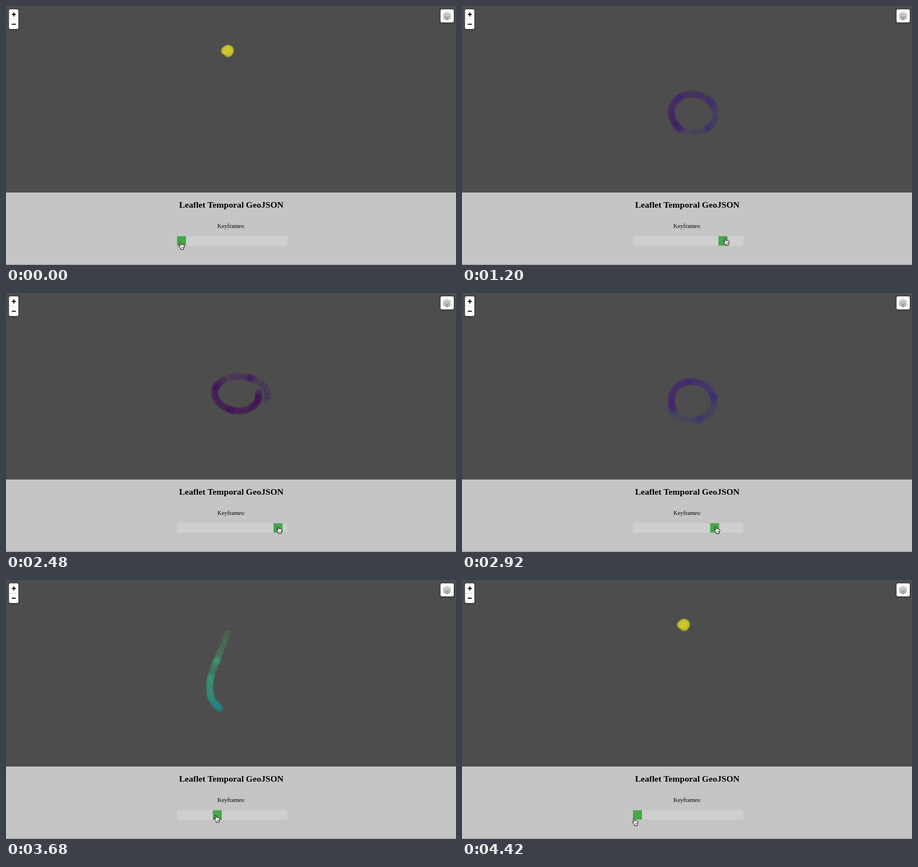
Write an HTML page with a canvas that moves like this. It is 800 px wide and 461 px high and loops after 4460 ms.

```html
<!DOCTYPE html>
<html lang="en">
<head>
<meta charset="utf-8">
<title>Leaflet Temporal GeoJSON</title>
<style>
html, body { margin: 0; width: 100%; height: 100%; overflow: hidden; background: #4d4d4d; }
canvas { display: block; }
</style>
</head>
<body>
<canvas id="stage" width="800" height="461"></canvas>
<script>
const ctx = document.getElementById('stage').getContext('2d');
const LOOP = 4460, LAG = 60, LAST = 36.7, STEP = 4.9;
const RAMP = [[208, 198, 46], [155, 214, 44], [65, 180, 105], [30, 122, 146], [40, 82, 142], [64, 34, 122], [64, 6, 88]];
const RAMP_STEP = 6;

const clamp = (v, lo = 0, hi = 1) => Math.min(hi, Math.max(lo, v));
const mix = (a, b, f) => a + (b - a) * f;
const easeOut = (v, power) => 1 - (1 - clamp(v)) ** power;

let seed = 7;
function random() {
  seed = (seed * 16807) % 2147483647;
  return seed / 2147483647;
}

// Place in the swarm (0 tail, 1 head): bunched towards the tail, denser towards the head
const dots = Array.from({ length: 64 }, (_, i) => {
  const q = ((i + random()) / 64) ** 0.75;
  return {
    q: q - 0.034 * (1 - q) * Math.sin(2 * Math.PI * q / 0.23),
    dx: 6 * (2 * random() - 1) ** 3,
    dy: 5 * (2 * random() - 1) ** 3,
    alpha: 0.16 + 0.12 * random()
  };
});

// The slider is dragged to the end, rests, and is dragged back
function progress(t) {
  return t < 2200 ? easeOut(t / 1800, 1.75) : easeOut((4220 - t) / 2000, 1.4);
}

// The swarm sinks from the top and winds into a drifting, flattening eddy
function position({ q, dx, dy }, s) {
  const age = s / 36;
  const tail = 270 * age ** 4;
  const head = 3.04 * s ** 1.5 * (1 - Math.exp(-((s / 9) ** 2)));
  const angle = mix(tail, head, q) * Math.PI / 180;
  const rx = 35 + 18 * age ** 3 * (1 - q);
  const ry = 38 - 8 * age ** 4;
  const rise = 78 * Math.exp(-angle / 0.57);
  const loose = Math.exp(-s / 10);
  return [
    394 + 21 * age ** 2 - rx * Math.sin(angle) + dx * loose,
    196 - 20 * age ** 8 - ry * Math.cos(angle) - rise + dy * loose
  ];
}

function rampColor(s) {
  const u = clamp(s / RAMP_STEP, 0, RAMP.length - 1.001), i = Math.floor(u);
  return RAMP[i].map((v, c) => Math.round(mix(v, RAMP[i + 1][c], u - i)));
}

function drawSwarm(s) {
  for (const dot of dots) {
    const [x, y] = position(dot, s);
    const shade = s + 5 * (dot.q - 0.5) * clamp(s / 6);
    ctx.fillStyle = `rgba(${rampColor(shade)},${dot.alpha})`;
    ctx.beginPath();
    ctx.arc(x, y, 6.7, 0, 7);
    ctx.fill();
  }
}

function rect(color, x, y, w, h) {
  ctx.fillStyle = color;
  ctx.fillRect(x, y, w, h);
}

function button(x, y, w, h) {
  ctx.save();
  ctx.shadowColor = 'rgba(0,0,0,.65)';
  ctx.shadowBlur = 3.3;
  ctx.shadowOffsetY = 0.7;
  ctx.fillStyle = '#fff';
  ctx.beginPath();
  ctx.roundRect(x, y, w, h, 2.7);
  ctx.fill();
  ctx.restore();
}

function drawControls() {
  button(5.3, 6, 16.7, 35);
  rect('#ccc', 5.3, 23, 16.7, 0.7);
  for (const y of [15, 32.5]) rect('#000', 10.3, y - 0.9, 7.2, 1.8);
  rect('#000', 13, 11.4, 1.8, 7.2);
  button(772.5, 6, 23.5, 23.3);
  for (let i = 0; i < 3; i++) {
    const y = 21 - i * 3.4;
    ctx.beginPath();
    ctx.moveTo(784, y - 4.8);
    ctx.lineTo(792.5, y);
    ctx.lineTo(784, y + 4.8);
    ctx.lineTo(775.5, y);
    ctx.closePath();
    const shade = ctx.createLinearGradient(0, y - 4.8, 0, y + 4.8);
    shade.addColorStop(0, '#e2e2e2');
    shade.addColorStop(1, i < 2 ? '#777' : '#b0b0b0');
    ctx.fillStyle = shade;
    ctx.fill();
    ctx.strokeStyle = '#f4f4f4';
    ctx.lineWidth = 0.7;
    ctx.stroke();
  }
}

function label(text, y, font) {
  ctx.font = font + ' "Liberation Serif", serif';
  ctx.textAlign = 'center';
  ctx.fillStyle = '#000';
  ctx.fillText(text, 400.5, y);
}

const hand = new Path2D(`M-3.6-5.2 C-3.6-6.8-1.6-6.8-1.4-5.2 L-.8-2.2 C-.3-3 .9-2.9 1.2-2
  C1.8-2.6 2.8-2.3 3-1.5 C3.8-1.9 4.8-1.4 4.8-.3 L4.6 2.6 L3.6 4.5 V6.2 H-1.6 V4.8
  L-4.8 1.2 C-5.6 0-4.2-1-3.2 0 L-2.5.6 Z`);
const knuckles = new Path2D('M-.1 1.5 V4 M1.5 1.5 V4 M3.1 1.5 V4');

function drawHand(t) {
  const p = progress(t), arc = Math.sin(Math.PI * p), out = t < 2200;
  ctx.save();
  ctx.translate(mix(out ? 312 : 308, 497, p), out ? mix(427, 422, p) - 7 * arc : mix(431, 422, p) - 3 * arc);
  ctx.fillStyle = '#fff';
  ctx.strokeStyle = '#000';
  ctx.lineWidth = 1;
  ctx.fill(hand);
  ctx.stroke(hand);
  ctx.lineWidth = 0.6;
  ctx.stroke(knuckles);
  ctx.restore();
}

function draw(now) {
  const t = now % LOOP;
  rect('#4d4d4d', 0, 0, 800, 332);
  drawSwarm(LAST * progress(Math.max(0, t - LAG)));
  drawControls();

  rect('#c5c5c5', 0, 332, 800, 129);
  rect('#999', 0, 460, 800, 1);
  label('Leaflet Temporal GeoJSON', 359, 'bold 15.6px');
  label('Keyframes:', 395, '10.6px');

  const left = Math.min(180, STEP * Math.round(LAST * progress(t)));
  rect('#cfcfcf', 304, 409.7, 196, 16.8);
  rect('#45a849', 304 + left, 409.7, 16, 16.8);
  drawHand(t);
  requestAnimationFrame(draw);
}
requestAnimationFrame(draw);
</script>
</body>
</html>
```
